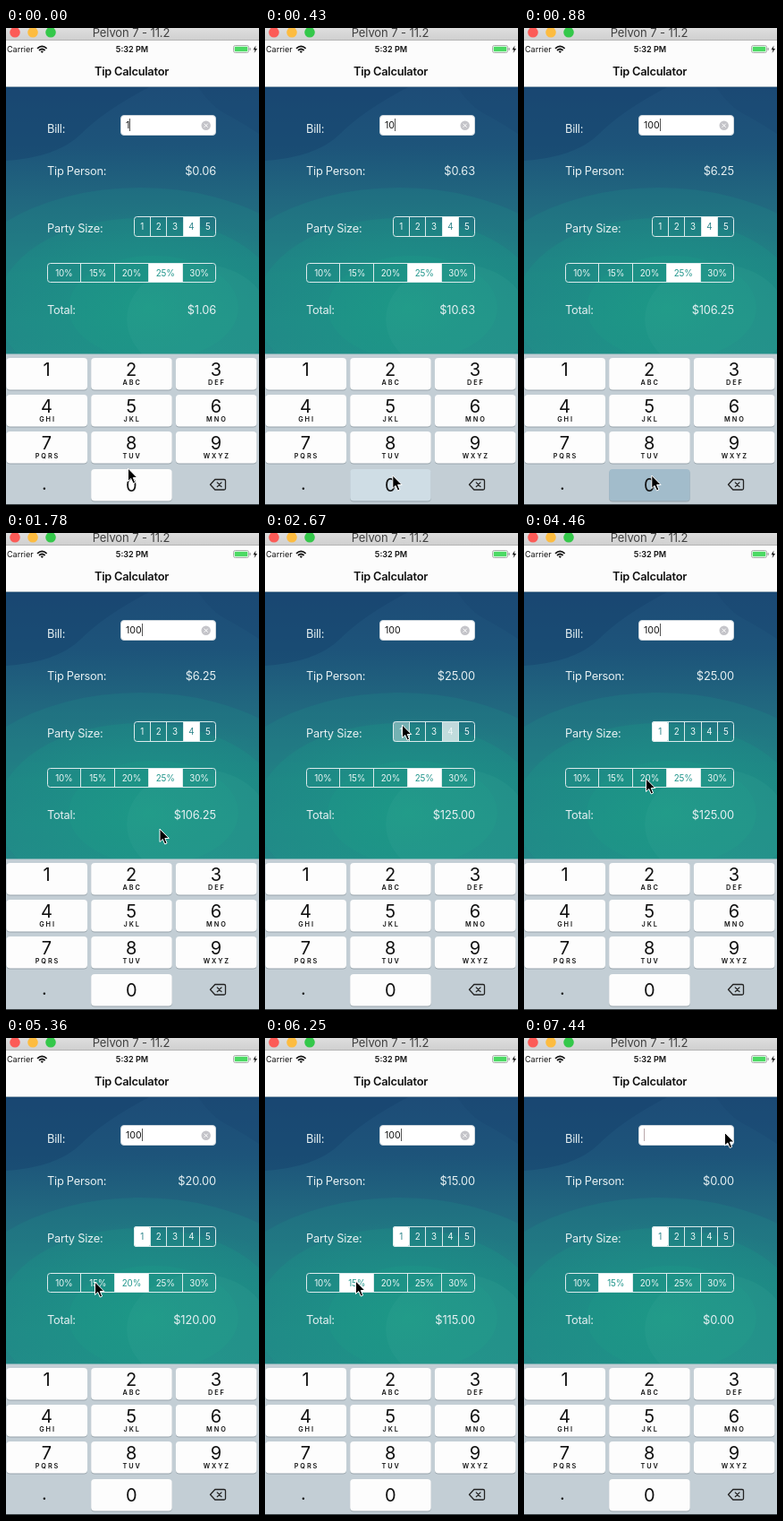
Write an HTML page that moves like this. It is 283 by 532 pixels and loops after 8000 ms.

```html
<!DOCTYPE html>
<html lang="en">
<head>
<meta charset="utf-8">
<title>Tip Calculator</title>
<style>
  html, body { margin: 0; width: 100%; height: 100%; overflow: hidden; background: #fff; }
  svg { display: block; width: 100%; height: 100%; }
  text { font-family: Inter, Roboto, "Liberation Sans", sans-serif; white-space: pre; }
  .body { font-size: 12.83px; letter-spacing: -.25px; fill: #e6f0f2; }
  .end { text-anchor: end; letter-spacing: -.12px; }
  .mid { text-anchor: middle; }
  .bold { font-weight: 600; }
  .status { font-size: 9.06px; fill: #111; }
  .seg { font-size: 9.8px; letter-spacing: -.1px; }
  .digit { font-size: 20px; fill: #111; }
  .letters { font-size: 7.3px; font-weight: 600; letter-spacing: 1.9px; fill: #111; }
</style>
</head>
<body>
<svg id="stage" viewBox="0 0 283 532">
  <defs>
    <linearGradient id="bar" x2="0" y2="1">
      <stop stop-color="#dedede"/><stop offset="1" stop-color="#cfcfcf"/>
    </linearGradient>
    <linearGradient id="sea" x2="0" y2="1">
      <stop stop-color="#1d4c77"/><stop offset=".22" stop-color="#1d547a"/>
      <stop offset=".42" stop-color="#21677f"/><stop offset=".7" stop-color="#237d83"/>
      <stop offset="1" stop-color="#258688"/>
    </linearGradient>
    <radialGradient id="glow">
      <stop stop-color="#1c9d86" stop-opacity=".7"/>
      <stop offset=".5" stop-color="#1c9787" stop-opacity=".4"/>
      <stop offset="1" stop-color="#1c9787" stop-opacity="0"/>
    </radialGradient>
    <clipPath id="page"><rect y="66" width="283" height="298"/></clipPath>
  </defs>

  <!-- backdrop -->
  <g clip-path="url(#page)">
    <rect y="66" width="283" height="298" fill="url(#sea)"/>
    <path d="M0 66H160Q110 92 84 118T0 148Z" fill="#15426c" opacity=".45"/>
    <path d="M215 66H283V118Q262 104 246 96T215 66Z" fill="#17446d" opacity=".3"/>
    <ellipse cx="150" cy="312" rx="215" ry="134" fill="#1f8b87" opacity=".25"/>
    <ellipse cx="150" cy="312" rx="160" ry="100" fill="#1d9687" opacity=".26"/>
    <ellipse cx="165" cy="312" rx="95" ry="58" fill="#1ea287" opacity=".22"/>
    <ellipse cx="160" cy="312" rx="175" ry="110" fill="url(#glow)"/>
    <ellipse cx="215" cy="325" rx="80" ry="62" fill="#3aa596" opacity=".18"/>
  </g>

  <!-- window bar, status bar, title -->
  <rect width="283" height="66" fill="#fcfcfc"/>
  <rect width="283" height="14" fill="url(#bar)"/>
  <rect y="13" width="283" height="1" fill="#b4b4b4"/>
  <circle cx="10" cy="4.800" r="5.800" fill="#fc5b57"/>
  <circle cx="30" cy="4.800" r="5.800" fill="#fdbc40"/>
  <circle cx="50" cy="4.800" r="5.800" fill="#34c84a"/>
  <text class="mid" x="140" y="10.400" font-size="13" letter-spacing="-.1" fill="#404040">Pelvon 7 - 11.2</text>
  <text class="status" x="1" y="27">Carrier</text>
  <g fill="none" stroke="#111" stroke-width="1.700">
    <path d="M35 22.800Q40.300 18 45.600 22.800M37 25Q40.300 22 43.600 25"/>
    <path d="M40.300 28L38.600 26Q40.300 24.800 42 26Z" fill="#111" stroke="none"/>
  </g>
  <text class="status bold mid" x="141" y="27">5:32 PM</text>
  <rect x="254.500" y="19.500" width="17" height="8" rx="2" fill="#fff" stroke="#9a9a9a" stroke-width=".8"/>
  <rect x="255.700" y="20.700" width="14.600" height="5.600" rx="1" fill="#4cd964"/>
  <rect x="272.500" y="22" width="1.200" height="3" rx=".6" fill="#9a9a9a"/>
  <path d="M279.500 19.500L276.500 24.300H278.600L277.600 28L281 23H278.800Z" fill="#111"/>
  <text class="body bold mid" x="140.500" y="53" style="fill:#111">Tip Calculator</text>
  <rect y="65" width="283" height="1" fill="#9fb0bd"/>

  <!-- form -->
  <g class="body">
    <text x="46" y="117">Bill:</text>
    <text x="46" y="164">Tip Person:</text>
    <text x="46" y="228">Party Size:</text>
    <text x="46" y="318.500">Total:</text>
    <text id="tip" class="end" x="235" y="164"></text>
    <text id="total" class="end" x="235" y="318.500"></text>
  </g>
  <rect x="128.500" y="97.500" width="106" height="22" rx="3.500" fill="#fff" stroke="#cbd5dc"/>
  <text id="bill" x="134" y="112.300" font-size="10.600" fill="#111"></text>
  <rect id="caret" y="101" width="1" height="14"/>
  <g id="clear">
    <circle cx="223.700" cy="108.700" r="5.200" fill="#c4c4c9"/>
    <path d="M221.700 106.700l4 4m0-4l-4 4" stroke="#fff"/>
  </g>
  <g id="party"></g>
  <g id="rate"></g>

  <!-- keyboard -->
  <rect y="363.500" width="283" height="168.500" fill="#c3ced5"/>
  <g id="keys"></g>
  <text class="digit mid" x="43" y="515">.</text>
  <g fill="none" stroke="#222" stroke-width="1.300" stroke-linejoin="round" stroke-linecap="round">
    <path d="M228.500 509.300L233.800 503.500H244Q245.500 503.500 245.500 505V513.500Q245.500 515 244 515H233.800Z"/>
    <path d="M236.300 506.900l4.700 4.700m0-4.700l-4.700 4.700"/>
  </g>
  <rect y="531" width="283" height="1" fill="#3a4145"/>

  <path id="pointer" d="M0 0V14.500L3.300 11.500L5.700 17L8.100 16L5.800 10.500H10.300Z"
    fill="#000" stroke="#fff" stroke-width="1" stroke-linejoin="round"/>
</svg>
<script>
const LOOP = 8000;
const $ = id => document.getElementById(id);

function add(parent, tag, attrs, text) {
  const node = document.createElementNS("http://www.w3.org/2000/svg", tag);
  for (const name in attrs) node.setAttribute(name, attrs[name]);
  if (text) node.textContent = text;
  return parent.appendChild(node);
}

// Segmented control: returns one setter per segment, level 0 (plain) to 1 (selected).
function segments(id, x, y, w, h, labels, ink) {
  const group = $(id), step = w / labels.length;
  const edge = i => Math.floor(x + i * step);
  const setters = labels.map((label, i) => {
    const left = edge(i);
    const fill = add(group, "rect", { x: left, y, width: edge(i + 1) - left, height: h, fill: "#fff",
      rx: i && i < labels.length - 1 ? 0 : 3 });
    const text = add(group, "text",
      { class: "seg mid", x: x + (i + .5) * step, y: y + h / 2 + 3.5 }, label);
    if (i) add(group, "rect", { x: left, y, width: 1, height: h, fill: "#d9ebeb" });
    return level => {
      fill.setAttribute("opacity", level);
      text.setAttribute("fill", level > .85 ? ink : "#eef7f7");
    };
  });
  add(group, "rect", { x: x + .5, y: y + .5, width: w - 1, height: h - 1, rx: 3,
    fill: "none", stroke: "#dcebec" });
  return setters;
}

const party = segments("party", 143, 210, 92, 23, ["1", "2", "3", "4", "5"], "#2b838a");
const rates = [10, 15, 20, 25, 30];
const rate = segments("rate", 46, 262, 189, 22, rates.map(r => r + "%"), "#1f958b");

const letters = ["", "ABC", "DEF", "GHI", "JKL", "MNO", "PQRS", "TUV", "WXYZ"];
const rowTop = row => Math.round(368 + row * 41.2);
function key(digit, x, y, word) {
  add($("keys"), "rect", { x, y: y + 1, width: 90.5, height: 35.5, rx: 4, fill: "#98a4ab" });
  const face = add($("keys"), "rect", { x, y, width: 90.5, height: 35.5, rx: 4, fill: "#fdfdfd" });
  add($("keys"), "text", { class: "digit mid", x: x + 45, y: y + (digit ? 19.7 : 24.7) }, String(digit));
  if (word) add($("keys"), "text", { class: "letters mid", x: x + 46, y: y + 30 }, word);
  return face;
}
letters.forEach((word, i) => key(i + 1, .5 + i % 3 * 94.7, rowTop(Math.floor(i / 3)), word));
const zeroKey = key(0, 95.2, rowTop(3));

// Every track is a list of [time, value...] held until the next entry.
const pointerTrack = [
  [0, 136.5, 491], [140, 139, 496], [290, 142.8, 499],
  [1330, 146, 481], [1480, 157, 440], [1630, 169, 385], [1780, 172, 330],
  [1920, 168, 285], [2070, 161, 250], [2220, 155, 225], [2370, 153.5, 214],
  [3270, 150, 222], [3420, 132, 240], [3570, 109.5, 262], [3720, 115, 273],
  [3860, 128, 275], [4010, 136.5, 274],
  [5210, 118, 273], [5360, 99.5, 272], [5660, 101.5, 271],
  [6400, 105, 267], [6550, 125, 245], [6700, 155, 205], [6850, 185, 160],
  [6990, 210, 125], [7140, 222, 108], [7290, 224.5, 105.5]
];
const billTrack = [[0, "1"], [290, "10"], [880, "100"], [7440, ""]];
const keyTrack = [[0, "#fdfdfd"], [140, "#a2bccb"], [430, "#cfdde5"], [580, "#fdfdfd"],
  [880, "#a2bccb"], [1030, "#fdfdfd"]];
const caretTrack = [0, 580, 880, 1330, 1780, 2220, 2820, 3270, 3570, 4010,
  4460, 4910, 5360, 5810, 6250, 6700, 7140].map((time, i) => [time, i % 2 === 0]);
const taps = [
  { time: 2520, set: party, from: 3, to: 0 },
  { time: 4610, set: rate, from: 3, to: 2 },
  { time: 5510, set: rate, from: 2, to: 1 }
];
// [time since tap, level of the old segment, level of the new one]
const fade = [[0, 1, .25], [150, .72, .38], [300, .35, .75], [440, 0, 1]];

function at(track, time) {
  let entry = track[0];
  for (const next of track) if (next[0] <= time) entry = next;
  return entry;
}

function select(set, start, time) {
  const levels = set.map((_, i) => +(i === start));
  let chosen = start;
  for (const tap of taps) {
    if (tap.set !== set || time < tap.time) continue;
    const [, old, fresh] = at(fade, time - tap.time);
    levels[tap.from] = old;
    levels[tap.to] = fresh;
    if (time >= tap.time + 150) chosen = tap.to;
  }
  set.forEach((apply, i) => apply(levels[i]));
  return chosen;
}

const money = value => "$" + value.toFixed(2);

function draw(time) {
  const people = select(party, 3, time) + 1;
  const percent = rates[select(rate, 3, time)];
  const bill = at(billTrack, time)[1];
  const tip = bill * percent / 100 / people;
  $("bill").textContent = bill;
  $("tip").textContent = money(tip);
  $("total").textContent = money(+bill + tip);
  $("clear").style.display = bill ? "" : "none";

  const caret = $("caret");
  caret.setAttribute("x", [134, 138, 145, 152][bill.length]);
  caret.setAttribute("fill", bill ? "#555" : "#b9a8aa");
  caret.setAttribute("opacity", +at(caretTrack, time)[1]);

  zeroKey.setAttribute("fill", at(keyTrack, time)[1]);
  const [, x, y] = at(pointerTrack, time);
  $("pointer").setAttribute("transform", `translate(${x} ${y})`);
}

const start = performance.now();
function tick() {
  draw((performance.now() - start) % LOOP);
  requestAnimationFrame(tick);
}
tick();
</script>
</body>
</html>
```
